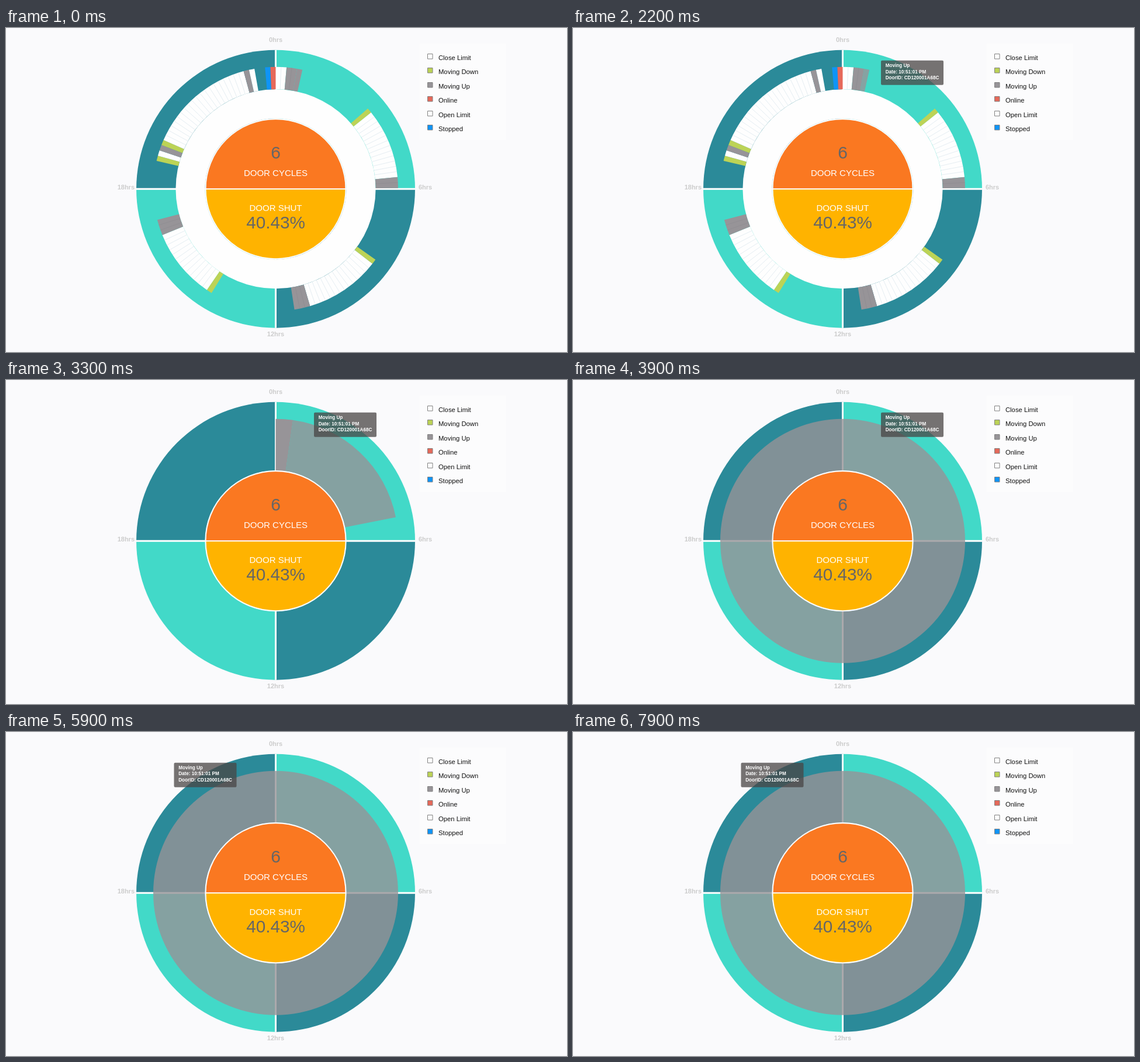
Write an HTML page with a canvas that moves like this. It is 960 px wide and 556 px high and loops after 8 s.

```html
<!DOCTYPE html>
<html lang="en">
<head>
<meta charset="utf-8">
<title>Door cycles</title>
<style>
html, body { margin: 0; width: 100%; height: 100%; overflow: hidden; background: #fafafc; }
canvas { display: block; }
</style>
</head>
<body>
<canvas id="stage" width="960" height="556"></canvas>
<script>
const ctx = document.getElementById('stage').getContext('2d');
const LOOP = 8000, HOVER = 1500, ZOOM = 2495, ZOOM_TIME = 1000, MOVE = 4600;
const CX = 461.5, CY = 276.2, OUTER = 238.5, RING = 209.5, DISC = 119.5;
const FONT = '"Liberation Sans", Arial, sans-serif';
const WHITE = '#fefefe', GREEN = '#bcd356', GREY = '#979498', RED = '#e6695a', BLUE = '#0f94f6';
const TEAL = '#42d9c8', DARK = '#2b8a99';

// start angle, end angle, colour, number of slices
const runs = [
  [0, 5.1, WHITE, 2], [5.1, 10.05, GREY, 2],
  [48.8, 51.2, GREEN, 1], [51.2, 84.4, WHITE, 13], [84.4, 89.6, GREY, 2],
  [125.4, 127.8, GREEN, 1], [127.8, 163.7, WHITE, 14], [163.7, 171.2, GREY, 3],
  [211.6, 214.2, GREEN, 1], [214.2, 247.8, WHITE, 13], [247.8, 255.3, GREY, 3],
  [283.3, 285.8, GREEN, 1], [285.8, 288.4, WHITE, 1], [288.4, 291.1, GREY, 1],
  [291.1, 293.6, GREEN, 1], [293.6, 344.8, WHITE, 20], [344.8, 347.4, GREY, 1],
  [347.4, 350, WHITE, 1], [355, 357.5, BLUE, 1], [357.5, 360, RED, 1]
];
const picked = [10.05, 12.6];

const legend = [['Close Limit', WHITE], ['Moving Down', GREEN], ['Moving Up', GREY],
  ['Online', RED], ['Open Limit', WHITE], ['Stopped', BLUE]];

const clamp = (v, lo, hi) => Math.min(hi, Math.max(lo, v));
const rad = deg => (deg - 90) * Math.PI / 180;
const easeCubic = p => p < .5 ? 4 * p ** 3 : 1 - 4 * (1 - p) ** 3;

function sector(from, to, inner, outer, color) {
  if (to <= from) return;
  ctx.beginPath();
  ctx.arc(CX, CY, outer, rad(from), rad(to));
  ctx.arc(CX, CY, inner, rad(to), rad(from), true);
  ctx.fillStyle = color;
  ctx.fill();
}

function circle(r, stroke, width) {
  ctx.beginPath();
  ctx.arc(CX, CY, r, 0, 2 * Math.PI);
  ctx.strokeStyle = stroke;
  ctx.lineWidth = width;
  ctx.stroke();
}

function spoke(deg, inner, outer, color) {
  const c = Math.cos(rad(deg)), s = Math.sin(rad(deg));
  ctx.beginPath();
  ctx.moveTo(CX + c * inner, CY + s * inner);
  ctx.lineTo(CX + c * outer, CY + s * outer);
  ctx.strokeStyle = color;
  ctx.lineWidth = .6;
  ctx.stroke();
}

function text(str, x, y, size, color, align = 'left', weight = '') {
  ctx.font = `${weight} ${size}px ${FONT}`;
  ctx.textAlign = align;
  ctx.fillStyle = color;
  ctx.fillText(str, x, y);
}

function drawBase() {
  ctx.fillStyle = '#fafafc';
  ctx.fillRect(0, 0, 960, 556);
  for (let q = 0; q < 4; q++) sector(q * 90, q * 90 + 90, 0, OUTER, q % 2 ? DARK : TEAL);
  ctx.fillStyle = '#fff';
  ctx.fillRect(CX - 1.5, CY - OUTER, 3, 2 * OUTER);
  ctx.fillRect(CX - OUTER, CY - 1.5, 2 * OUTER, 3);
  text('0hrs', 461.5, 24, 11, '#ccc', 'center', 'bold');
  text('6hrs', 706, 276.5, 11, '#ccc', 'left', 'bold');
  text('12hrs', 461.5, 528.5, 11, '#ccc', 'center', 'bold');
  text('18hrs', 220, 276.5, 11, '#ccc', 'right', 'bold');
}

function drawRing(zoom, hovered) {
  const low = Math.sqrt(zoom * 2 / 3);
  const radius = y => RING * Math.max(0, (Math.sqrt(y) - low) / (1 - low));
  const start = zoom * picked[0], end = 360 + zoom * (picked[1] - 360);
  const angle = a => clamp((a - start) / (end - start) * 360, 0, 360);
  const inner = radius(2 / 3);

  sector(0, 360, radius(1 / 3), inner, '#fefefe');
  for (const [a, b, color, count] of runs) {
    sector(angle(a), angle(b), inner, RING, color);
    const line = color === WHITE ? '#d3e1ea' : '#8c8a8f';
    for (let i = 1; i < count; i++) {
      const mid = angle(a + (b - a) * i / count);
      if (mid > 0 && mid < 360) spoke(mid, inner, RING, line);
    }
  }
  ctx.globalAlpha = hovered ? .8 : 1;
  sector(angle(picked[0]), angle(picked[1]), inner, RING, GREY);
  ctx.globalAlpha = 1;
}

function drawDisc() {
  circle(DISC + 1.2, '#eef2f5', 1);
  sector(-90, 90, 0, DISC, '#fa7821');
  sector(90, 270, 0, DISC, '#ffb300');
  circle(DISC + .3, '#fff', 1.6);
  ctx.fillStyle = '#fff';
  ctx.fillRect(CX - DISC, CY - 1, 2 * DISC, 2);
  text('6', CX, 224, 30, '#666', 'center');
  text('DOOR CYCLES', CX, 253.5, 15, '#fff', 'center');
  text('DOOR SHUT', CX, 314, 15, '#fff', 'center');
  text('40.43%', CX, 344, 29.7, '#666', 'center');
}

function drawLegend() {
  ctx.fillStyle = '#fcfcfd';
  ctx.fillRect(708, 27, 148, 165);
  legend.forEach(([label, color], i) => {
    const y = 24.45 * i;
    ctx.fillStyle = color;
    ctx.strokeStyle = '#808080';
    ctx.lineWidth = 1;
    ctx.beginPath();
    ctx.rect(721.5, Math.round(44 + y) + .5, 8.5, 8.5);
    ctx.fill();
    ctx.stroke();
    text(label, 740, 55 + y, 11.25, '#111');
  });
}

function drawTooltip(x, y) {
  ctx.fillStyle = 'rgba(72, 68, 68, .75)';
  ctx.beginPath();
  ctx.roundRect(x, y, 107, 42, 2);
  ctx.fill();
  ['Moving Up', 'Date: 10:51:01 PM', 'DoorID: CD120001A68C'].forEach((line, i) =>
    text(line, x + 7.7, y + 11.3 + 10.4 * i, 8.15, '#fff', 'left', 'bold'));
}

function draw() {
  const t = performance.now() % LOOP;
  drawBase();
  drawRing(easeCubic(clamp((t - ZOOM) / ZOOM_TIME, 0, 1)), t >= HOVER);
  drawDisc();
  drawLegend();
  if (t >= MOVE) drawTooltip(287.5, 52.7);
  else if (t >= HOVER) drawTooltip(527, 55.8);
  requestAnimationFrame(draw);
}
draw();
</script>
</body>
</html>
```
